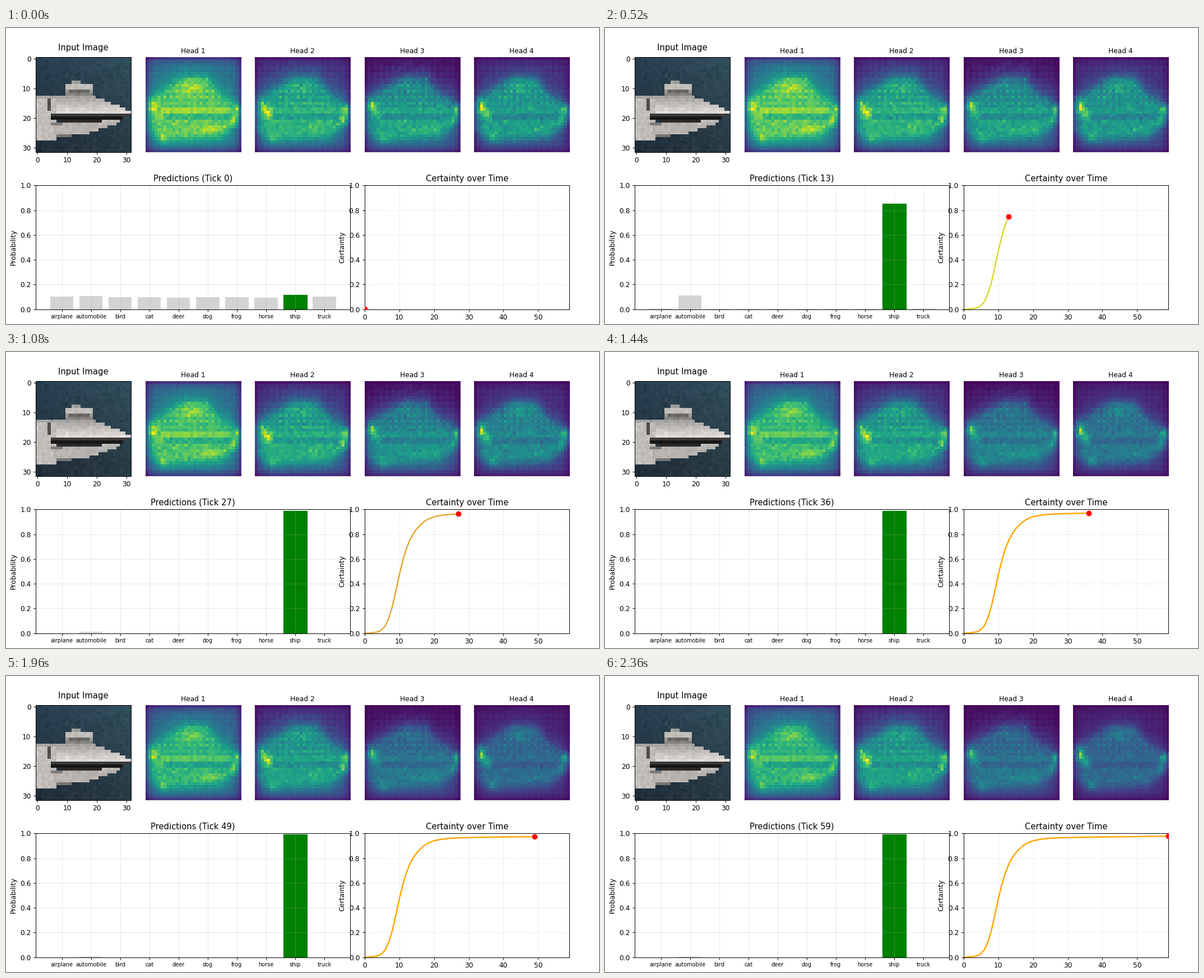
Recreate the animation shown at these times as a matplotlib script. Size 1058 by 529 pixels, loop 2400 ms.

```python
import numpy as np
import matplotlib.pyplot as plt
from matplotlib.animation import FuncAnimation

W, H, DPI = 1058, 529, 88.1667
TICKS, N = 60, 32
CLASSES = ["airplane", "automobile", "bird", "cat", "deer",
           "dog", "frog", "horse", "ship", "truck"]
AUTO, SHIP = CLASSES.index("automobile"), CLASSES.index("ship")

plt.rcParams["font.family"] = "DejaVu Sans"
rng = np.random.default_rng(8)
Y, X = np.mgrid[:N, :N].astype(float)


def gate(d, width):
    return 1 / (1 + np.exp(-d / width))


def blob(cx, cy, sx, sy):
    return np.exp(-((X - cx) / sx) ** 2 - ((Y - cy) / sy) ** 2)


# Input picture: dark water, a pale boat, its wake and a dark window band
def boat_image():
    img = np.stack([40 + .3 * X - .25 * Y,
                    63 + .45 * X - .6 * Y,
                    80 + .35 * X - .75 * Y], axis=-1)
    img += rng.normal(0, 3.5, (N, N, 1))

    def fill(mask, tone):
        img[mask] = np.multiply.outer(np.broadcast_to(tone, X.shape)[mask],
                                      [1, .985, .965])

    def span(y, x0, x1, tone):
        fill((Y == y) & (X >= x0) & (X < x1), tone)

    cabin = (abs(X - 14) < 5) & (abs(Y - 10.5) < 2)
    fill(cabin, 195 - 22 * (Y - 9) * (Y > 10))
    span(8, 12, 15, 165)
    span(11, 11, 18, 105)
    fill((Y > 12) & (Y < 19) & (X < 20 + 2.4 * (Y - 13)), 165 + 12 * (Y - 13))
    fill((Y > 13) & (Y < 28) & (X < 7), 192)
    fill((Y > 13) & (Y < 18) & (X == 4), 80)
    fill((Y > 21) & (Y < 26) & (X > 5) & (X < 27 - 3.3 * (Y - 22)), 182)
    span(19, 5, 31, 60)
    span(20, 5, 29, 24)
    span(21, 8, 22, 42)
    span(21, 22, 28, 190)
    span(22, 5, 9, 125)
    span(26, 7, 12, 120)
    img += rng.normal(0, 5, (N, N, 1)) * (img[..., :1] > 90)
    return np.clip(img, 0, 255).astype(np.uint8)


# Attention maps: a boat-shaped plateau with a halo, dotted texture and peaks
top = np.interp(X, [0, 2, 10, 13, 20, 25, 31], [13, 13, 8, 6.5, 7, 13, 16])
low = np.interp(X, [0, 5, 24, 31], [24, 27.5, 26, 21])
inside = gate(Y - top + .5, .8) * gate(low - Y + .5, .8)
halo = gate(Y - top + 4, 1.8) * gate(low + 3 - Y, 1.3)


def border(v):
    return 1 - np.exp(-(np.minimum(v, N - 1 - v) + .75) / 1.3)


rim = border(X) * border(Y)
dots = ((X % 2 == 0) & (Y % 2 == 1)) - .3
weave = X % 2 + Y % 2 - 1
band = gate(X - 5, .5) * gate(28 - X, .5)
slit = band * (abs(Y - 19.5) < 1)
deck = band * (abs(Y - 17.5) < 1)
noise = rng.normal(0, .024, (4, N, N))

# stern, stern low, bow, bow low, cabin, keel, wake
SPOTS = np.array([blob(2, 16, 1.4, 2.3), blob(4, 18.5, 1.3, 1.8),
                  blob(30, 17.3, 1, 1.6), blob(29, 20.8, 1.3, 1.7),
                  blob(15, 9.5, 4.5, 2.5), blob(20, 24, 5, 1.5),
                  blob(5.7, 26.5, 1.5, 1.4)])
# sky, sea, halo, body, deck, strength at the end, then one gain per spot
HEADS = [
    ((.38, .42, .12, .22, .11, .86), (.28, .15, .28, .2, .16, .14, .15)),
    ((.15, .32, .12, .23, .03, .88), (.26, .34, .36, .28, .1, .03, .1)),
    ((.06, .30, .10, .22, .02, .66), (.4, .1, .28, .18, .07, .06, .08)),
    ((.13, .22, .08, .27, .02, .60), (.44, .2, .4, .15, .1, .03, .13)),
]


def head_map(k, tick):
    (sky, sea, glow, body, line, end), gains = HEADS[k]
    base = sky + (sea - sky) * gate(Y - 13, 4)
    base = base + glow * halo + body * inside + line * deck - .09 * slit
    base += .09 * dots * inside * (Y < 17) + .022 * weave * (1 - inside)
    base += noise[k] * (.5 + inside)
    fade = 1 + (end - 1) * gate(tick - 30, 7)
    peaks = np.tensordot(gains, SPOTS, 1) * (1 + 6 * noise[k])
    return np.clip(rim * base * fade + peaks, 0, 1)


# Certainty: odds follow a piecewise power law under a slowly rising ceiling
ticks = np.arange(TICKS)
odds = np.exp(np.interp(np.log(ticks + 1e-9),
                        np.log([1, 4, 6, 8, 10, 12, 16, 20, 27, 59]),
                        np.log([1e-3, .0125, .067, .285, .94, 2.34, 8.9, 31,
                                140, 999])))
CERTAINTY = (.969 + .01 * (ticks / 59) ** 2) * odds / (1 + odds)


def peaked(ship, auto):
    p = np.full(10, (1 - ship - auto) / 8)
    p[SHIP], p[AUTO] = ship, auto
    return p


KEYS = np.log([
    peaked(.105, .1),
    [.072, .215, .045, .04, .032, .037, .045, .02, .415, .088],
    peaked(.971, .0275),
    peaked(.9927, .005),
])


def probs_at(u):
    e = np.exp([np.interp(u, range(4), col) for col in KEYS.T])
    return e / e.sum()


# Certainty is one minus the normalised entropy, so it fixes the bar heights
path = np.linspace(0, 3, 400)
path_cert = [1 + (p * np.log(p)).sum() / np.log(10)
             for p in map(probs_at, path)]
PROBS = [probs_at(u) for u in np.interp(CERTAINTY, path_cert, path)]

fig = plt.figure(figsize=(12, 6), dpi=DPI, facecolor="white")
LEFT, PITCH, SIDE = 53.2, 195.5, 170
UPPER, LOWER = (52.2, 169.6), (281.3, 221.3)


def panel(col, row, span=1):
    y, h = row
    w = PITCH * (span - 1) + SIDE
    return fig.add_axes([(LEFT + PITCH * col) / W, 1 - (y + h) / H,
                         w / W, h / H])


def show(ax, data, **kw):
    return ax.imshow(data, interpolation="nearest", aspect="auto", **kw)


ax_in = panel(0, UPPER)
show(ax_in, boat_image())
ax_in.set_title("Input Image", fontsize=12, pad=10)

maps = []
for k in range(4):
    ax = panel(k + 1, UPPER)
    maps.append(show(ax, head_map(k, 0), cmap="viridis", vmin=0, vmax=1))
    ax.set_title(f"Head {k + 1}", fontsize=10)
    ax.axis("off")

ax_bar = panel(0, LOWER, 3)
bars = ax_bar.bar(range(10), PROBS[0], color="lightgray")
bars[SHIP].set(facecolor="green", edgecolor="green", linewidth=1)
ax_bar.set(xlim=(-.89, 9.89), ylim=(0, 1), ylabel="Probability")
ax_bar.set_xticks(range(10), CLASSES, fontsize=8)
ax_bar.grid(alpha=.3)
bar_title = ax_bar.set_title("", fontsize=12)

ax_cert = panel(3, LOWER, 2)
ax_cert.set(xlim=(0, TICKS - 1), ylim=(0, 1), xlabel="Tick",
            ylabel="Certainty")
ax_cert.set_title("Certainty over Time", fontsize=12)
ax_cert.grid(alpha=.3, linestyle="--")
curve, = ax_cert.plot([], [], lw=2)
dot, = ax_cert.plot([], [], "o", ms=7, zorder=5)


def line_color(tick):
    if tick < 24:
        return "#d9d82b"
    return "#e4a632" if tick < 30 else "orange"


def update(tick):
    for k, im in enumerate(maps):
        im.set_data(head_map(k, tick))
    for bar, p in zip(bars, PROBS[tick]):
        bar.set_height(p)
    bar_title.set_text(f"Predictions (Tick {tick})")
    curve.set_data(ticks[:tick + 1], CERTAINTY[:tick + 1])
    curve.set_color(line_color(tick))
    dot.set_data([tick], [CERTAINTY[tick]])
    dot.set_color("#7a3636" if 3 <= tick < 13 else "red")
    return [*maps, *bars, bar_title, curve, dot]


anim = FuncAnimation(fig, update, frames=TICKS, interval=40, repeat=True,
                     repeat_delay=0, blit=False)
plt.show()
```
